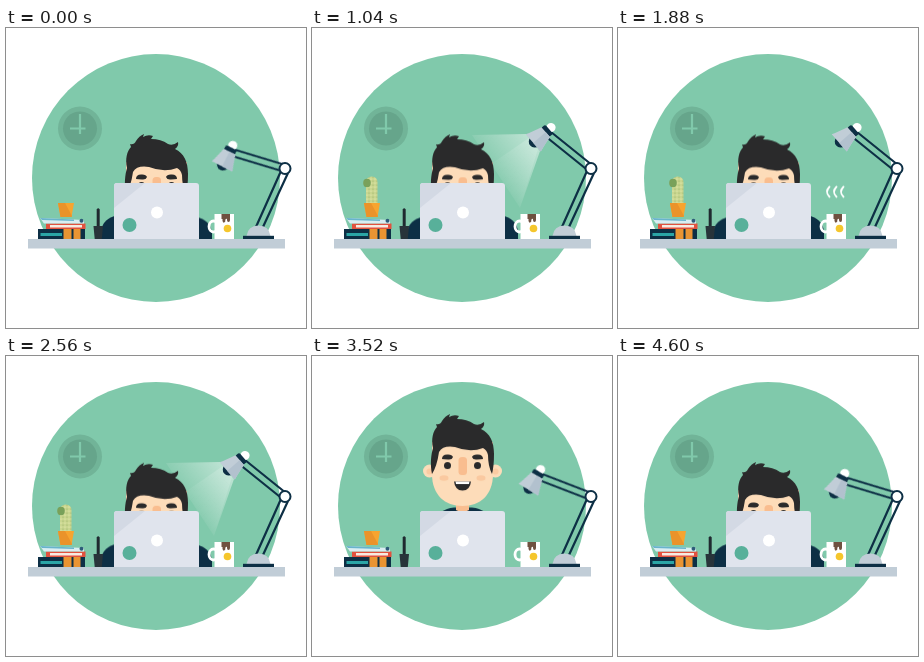
An HTML page for the animation above (4.64 s loop, 300 by 300 pixels).

```html
<!DOCTYPE html>
<html lang="en">
<head>
<meta charset="utf-8">
<title>Desk worker</title>
<style>
  html, body { margin: 0; width: 100%; height: 100%; overflow: hidden; background: #fff; }
  svg { display: block; width: 100%; height: 100%; }

  .navy { fill: #0d2f45; }
  .steel { fill: #c1cdd7; }
  .skin { fill: #fddcb9; }
  .blush { fill: #f9bd8f; }
  .hair { fill: #2a2a2b; }
  .rod { fill: none; stroke: #0d2f45; stroke-width: 2.2; }

  .man, .arm, .lamp, .cactus, .beam, .steam { animation: 4640ms linear infinite; }
  .man { animation-name: man; }
  .left { animation-name: tuck-left; }
  .right { animation-name: tuck-right; }
  .lamp { animation-name: lamp; transform-origin: 279px 140px; }
  .cactus { animation-name: cactus; }
  .beam { animation-name: beam; }
  .steam { animation-name: steam; }
  .nod { animation: nod 290ms ease-in-out infinite alternate; }
  .type { animation: type 145ms ease-in-out infinite alternate; }
  .late { animation-delay: -145ms; }

  @keyframes man {
    0%, 56% { transform: translateY(48px); animation-timing-function: ease-in-out; }
    61.4% { transform: translateY(-4px); animation-timing-function: ease-in-out; }
    63.2%, 85.5% { transform: none; animation-timing-function: ease-in-out; }
    87.5% { transform: translateY(-4px); animation-timing-function: ease-in; }
    92% { transform: translateY(51px); animation-timing-function: ease-out; }
    94.5%, 100% { transform: translateY(48px); }
  }
  @keyframes tuck-left {
    0%, 55.5% { transform: none; }
    59%, 89.5% { transform: translateX(16px); }
    93%, 100% { transform: none; }
  }
  @keyframes tuck-right {
    0%, 55.5% { transform: none; }
    59%, 89.5% { transform: translateX(-16px); }
    93%, 100% { transform: none; }
  }
  @keyframes lamp {
    0%, 4.8% { transform: rotate(-22deg); animation-timing-function: ease-in-out; }
    9.5% { transform: rotate(10deg); animation-timing-function: ease-in-out; }
    15.5% { transform: rotate(-3deg); animation-timing-function: ease-in-out; }
    18.5%, 71% { transform: none; animation-timing-function: ease-in-out; }
    73.3% { transform: rotate(10deg); animation-timing-function: ease-in; }
    75.9% { transform: rotate(-18deg); animation-timing-function: ease-out; }
    77.6% { transform: rotate(-25deg); animation-timing-function: ease-in-out; }
    80.5%, 100% { transform: rotate(-22deg); }
  }
  @keyframes cactus {
    0%, 5.2% { transform: translateY(31px); animation-timing-function: ease-out; }
    9.5% { transform: translateY(-2px); animation-timing-function: ease-in-out; }
    13%, 70.5% { transform: none; animation-timing-function: ease-in-out; }
    72% { transform: translateY(-2px); animation-timing-function: ease-in; }
    75%, 100% { transform: translateY(31px); }
  }
  @keyframes beam {
    0%, 18.5% { opacity: 0; }
    20.7%, 32% { opacity: 1; }
    36%, 43% { opacity: 0; }
    47%, 60% { opacity: 1; }
    63% { opacity: .65; }
    67%, 100% { opacity: 0; }
  }
  @keyframes steam {
    0%, 34% { opacity: 0; transform: translateY(8px); }
    38.5% { opacity: 1; transform: translateY(2px); }
    42% { opacity: 1; transform: translateY(-1px); }
    48%, 100% { opacity: 0; transform: translateY(-7px); }
  }
  @keyframes nod { from { transform: none; } to { transform: translateY(.8px); } }
  @keyframes type { from { transform: none; } to { transform: translateY(1.5px); } }
</style>
</head>
<body>
<svg viewBox="0 0 300 300">
  <defs>
    <linearGradient id="glow" gradientUnits="userSpaceOnUse" x1="224" y1="113" x2="180" y2="146">
      <stop offset="0" stop-color="#fff" stop-opacity=".5"/>
      <stop offset="1" stop-color="#fff" stop-opacity=".03"/>
    </linearGradient>
    <clipPath id="above-desk"><path d="M0 0H300V211H0Z"/></clipPath>
    <clipPath id="above-pot"><path d="M45 130H75V176H45Z"/></clipPath>
    <pattern id="spines" width="4" height="4" patternUnits="userSpaceOnUse">
      <path d="M0 0H4V4H0Z" fill="#c9d68f"/>
      <circle cx="1" cy="1" r=".6" fill="#93aa62"/>
      <circle cx="3" cy="3" r=".6" fill="#eff0bd"/>
    </pattern>
  </defs>

  <circle cx="150" cy="150" r="124" fill="#80c9ab"/>

  <!-- clock -->
  <circle cx="74" cy="100.5" r="22" fill="#71b498"/>
  <circle cx="74" cy="100.5" r="17" fill="#66a58b"/>
  <path d="M74 86V106M64 100.5H79.5" stroke="#80c9ab" stroke-width="2.2"/>

  <g class="beam" fill="url(#glow)">
    <path d="M214 106L228 123L208 180L160 107Z"/>
    <path d="M217 110L226 121L208 180L179 136Z" opacity=".4"/>
  </g>

  <!-- worker -->
  <g clip-path="url(#above-desk)">
    <g class="arm left"><path class="navy type" d="M112 187Q97 190 95 203V214H112Z"/></g>
    <g class="arm right"><path class="navy type late" d="M189 187Q204 190 206 203V214H189Z"/></g>
    <g class="man"><g class="nod">
      <path class="navy" d="M130 156Q134 152 142 151.500H160Q168 152 172 156V162H130Z"/>
      <path class="blush" d="M144 142H157V154Q150.500 158 144 154Z"/>
      <g class="skin">
        <circle cx="117.500" cy="115" r="6.500"/>
        <circle cx="183.500" cy="115" r="6.500"/>
        <path d="M120 86H181V118C181 139 168 150 150.500 150S120 139 120 118Z"/>
      </g>
      <g class="blush">
        <circle cx="117.500" cy="115.500" r="3" opacity=".55"/>
        <circle cx="183.500" cy="115.500" r="3" opacity=".55"/>
        <ellipse cx="132" cy="122" rx="4.500" ry="2.800" opacity=".6"/>
        <ellipse cx="169" cy="122" rx="4.500" ry="2.800" opacity=".6"/>
        <rect x="146.500" y="101" width="8.500" height="18" rx="3.500"/>
      </g>
      <g class="hair">
        <path d="M120 118C118 108 119 99 121 92C119 83 121 75 125 71L124 68Q128 69 130 65Q133 60 138 58L137 61Q142 58 147 60L145 63Q155 63 162 68Q167 70 172 66Q173 70 169 73C178 77 182 86 182 98Q182 110 180 118Q176 110 176 99Q175 94 171 92Q158 97 143 91Q131 89 127 96Q125 110 120 118Z"/>
        <path d="M130 103Q130 98.500 135 98.500Q140 98 141 101Q140 104 136 103.500Q132 103 130 103ZM171 103Q171 98.500 166 98.500Q161 98 160 101Q161 104 165 103.500Q169 103 171 103Z"/>
        <circle cx="135.500" cy="109.500" r="3.500"/>
        <circle cx="165.500" cy="109.500" r="3.500"/>
        <path d="M142 125.500H159Q158 134.500 150.500 134.500T142 125.500Z"/>
      </g>
      <path d="M143.500 125.500H157.500L157 128H144Z" fill="#fff"/>
    </g></g>
  </g>

  <!-- laptop -->
  <path d="M108 211V158Q108 155 111 155H190Q193 155 193 158V211Z" fill="#e0e4ed"/>
  <path d="M108 180V158Q108 155 111 155H139Z" fill="#d3d9e4"/>
  <circle cx="151" cy="184.500" r="6" fill="#fff"/>
  <circle cx="123.500" cy="197" r="7" fill="#58b09a"/>

  <!-- pen holder -->
  <path d="M90.700 199V181.500Q92.200 179 93.700 181.500V199Z" fill="#1f2a30"/>
  <path d="M87.500 198H97L95.800 211H88.700Z" fill="#28343a"/>

  <!-- books -->
  <path class="navy" d="M32 201H79V211H32Z"/>
  <path d="M34.500 205H56V208H34.500Z" fill="#2ba5a6"/>
  <path d="M57.500 201H65.500V211H57.500ZM67.500 201H74.500V211H67.500Z" fill="#e99432"/>
  <path d="M40 195.500H79.500V201H40Z" fill="#e2523f"/>
  <path d="M44 197H76V199.500H44Z" fill="#f6ebe2"/>
  <path d="M34 190L78 192V195.500H38Z" fill="#d9edf2"/>
  <path d="M34 190L68 191.500V193L36 192Z" fill="#68b4cc"/>
  <circle cx="75.500" cy="192.700" r="2" fill="#2d5c79"/>

  <!-- cactus -->
  <g clip-path="url(#above-pot)"><g class="cactus">
    <rect x="54" y="148.500" width="11.500" height="34" rx="5.500" fill="url(#spines)"/>
    <ellipse cx="55" cy="155" rx="3.800" ry="4.200" fill="#79a15a"/>
  </g></g>
  <path d="M52 175H68L65.500 189H54.500Z" fill="#f7a42f"/>
  <path d="M52 175H59L66 188L65.500 189H54.500Z" fill="#ea932a"/>

  <!-- mug -->
  <g class="steam" fill="none" stroke="#fff" stroke-width="1.800" stroke-linecap="round">
    <path d="M211.500 158.500q-5 5 0 10M218.500 158.500q-5 5 0 10M225.500 158.500q-5 5 0 10"/>
  </g>
  <ellipse cx="207.500" cy="198.500" rx="4.500" ry="5.500" fill="none" stroke="#fff" stroke-width="2.800"/>
  <path d="M208.500 186H228V211H208.500Z" fill="#fff"/>
  <path d="M215.500 186H224V192Q224 194 222.500 194T221 192V191Q220 190 219.300 192V193.500Q217.500 196 216.500 193V191H215.500Z" fill="#6f5140"/>
  <circle cx="221.500" cy="200.500" r="3.800" fill="#f5c62c"/>

  <!-- lamp -->
  <path class="rod" d="M249.500 200L275 143M256.500 200L282 145"/>
  <path class="steel" d="M240.500 208Q242 197.500 252.500 197.500T264.500 208Z"/>
  <path class="navy" d="M237 207.800H268V211H237Z"/>
  <g class="lamp">
    <path class="rod" d="M239 104L280 137M235 109.500L276 142.500"/>
    <g transform="translate(239 99.500) rotate(139)">
      <circle class="navy" cx="21.500" r="6"/>
      <circle r="4.600" fill="#fff"/>
      <rect class="navy" x="2.500" y="-6" width="6" height="12" rx="1.500"/>
      <path class="steel" d="M7 -6.500Q17 -9 23.500 -11.500V11.500Q17 9 7 6.500Z"/>
      <path d="M7 0V-6.500Q17 -9 23.500 -11.500V0Z" fill="#b2c1ce"/>
    </g>
  </g>
  <circle cx="279" cy="140.500" r="5.500" fill="#fff" stroke="#0d2f45" stroke-width="2"/>

  <path class="steel" d="M22 211H279V220.500H22Z"/>
</svg>
</body>
</html>
```
